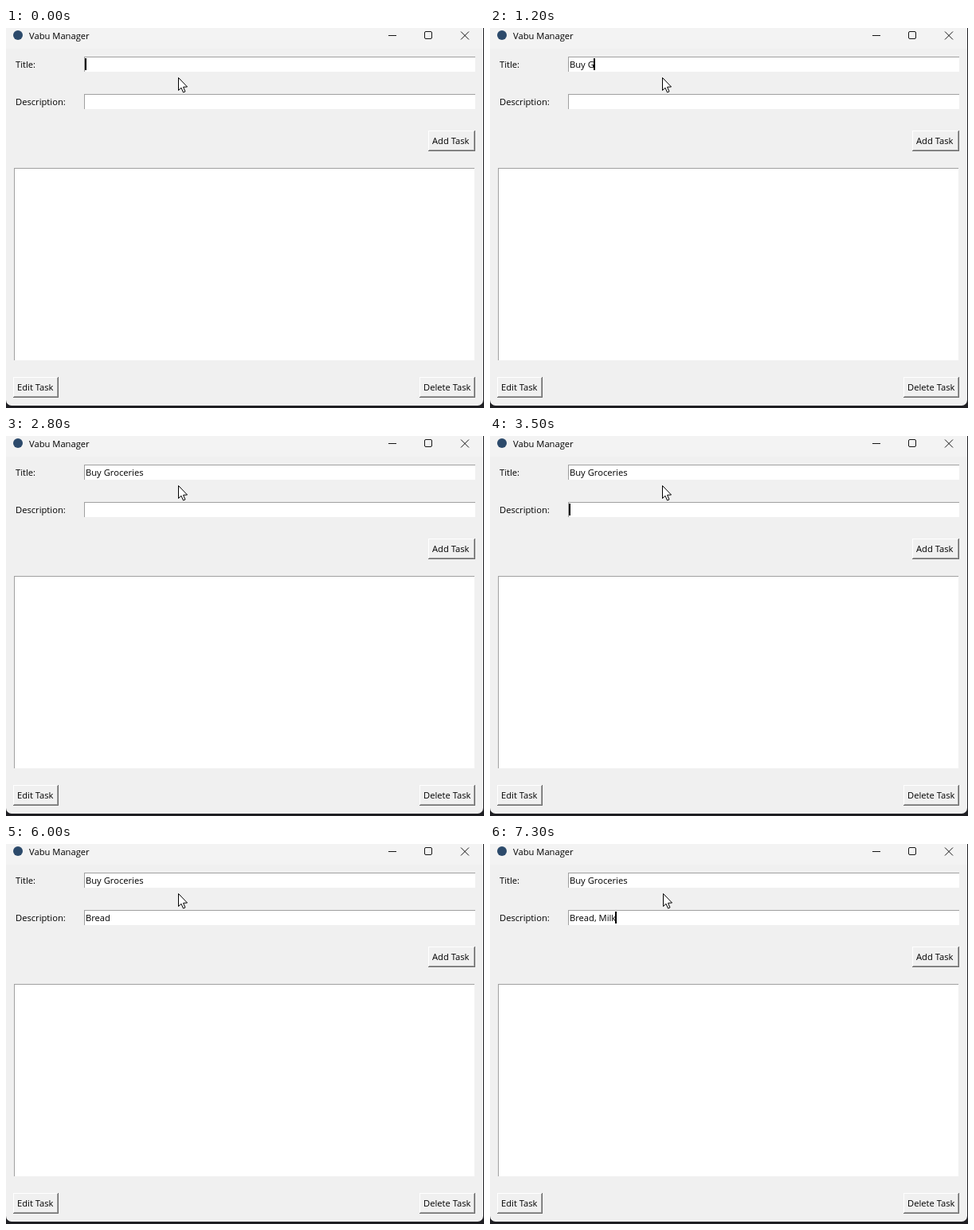
An HTML page with a canvas that plays this animation: 600 px wide and 478 px high, repeating every 8 s.

```html
<!DOCTYPE html>
<html lang="en">
<head>
<meta charset="utf-8">
<title>Task window</title>
<style>
  html, body { margin: 0; width: 100%; height: 100%; overflow: hidden; background: #1f1f23; }
  canvas { display: block; }
</style>
</head>
<body>
<canvas id="stage" width="600" height="478"></canvas>
<script>
const ctx = document.getElementById('stage').getContext('2d');
const LOOP = 8000;
const FONT = '11.2px "Open Sans", "Noto Sans", sans-serif';
const FACE = '#f0f0f0', SHADE = '#a0a0a0', DARK = '#696969', INK = '#000';

// [time, number of letters typed]
const titleField = {
  text: 'Buy Groceries', y: 36,
  keys: [[900, 2], [1100, 3], [1200, 5], [1600, 7], [1700, 8], [1900, 9], [2400, 11], [2500, 13]]
};
const descField = {
  text: 'Bread, Milk', y: 83,
  keys: [[4700, 2], [4900, 3], [5400, 4], [5600, 5], [6400, 8], [6700, 9], [6900, 10], [7000, 11]]
};

// Spans in which each caret is visible
titleField.caret = [[0, 200], [500, 2800], [3400, 3500]];
descField.caret = [[3500, 5900], [6400, LOOP]];

function rect(x, y, w, h, color) {
  ctx.fillStyle = color;
  ctx.fillRect(x, y, w, h);
}

function label(text, x, baseline) {
  ctx.font = FONT;
  ctx.fillStyle = INK;
  ctx.fillText(text, x, baseline);
}

function sunken(x, y, w, h) {
  rect(x, y, w, h, '#fff');
  rect(x, y, w, 1, SHADE);
  rect(x, y, 1, h, SHADE);
}

function button(text, x, y, w, textX) {
  const h = 26;
  rect(x, y, w, h, DARK);
  rect(x, y, w - 1, h - 1, '#fff');
  rect(x + 1, y + 1, w - 2, h - 2, SHADE);
  rect(x + 1, y + 1, w - 3, h - 3, FACE);
  label(text, textX, y + 17);
}

function field({ text, y, keys, caret }, t) {
  sunken(98, y, 491, 19);
  const count = keys.reduce((n, [at, length]) => t >= at ? length : n, 0);
  const typed = text.slice(0, count);
  label(typed, 100, y + 14);
  if (caret.some(([from, to]) => t >= from && t < to)) {
    rect(Math.round(99 + ctx.measureText(typed).width), y + 2, 2, 15, INK);
  }
}

function titleBar() {
  rect(0, 0, 599, 26, '#f3f3f3');
  ctx.fillStyle = '#2c4a6b';
  ctx.beginPath();
  ctx.arc(15, 9, 6, 0, Math.PI * 2);
  ctx.fill();
  label('Vabu Manager', 29, 14);

  ctx.strokeStyle = '#151515';
  ctx.lineWidth = 1;
  ctx.beginPath();
  ctx.moveTo(480, 9.5);
  ctx.lineTo(490, 9.5);
  ctx.roundRect(525.5, 4.5, 9, 9, 1.5);
  ctx.moveTo(571, 4.5);
  ctx.lineTo(581, 14.5);
  ctx.moveTo(581, 4.5);
  ctx.lineTo(571, 14.5);
  ctx.stroke();
}

function pointer(x, y) {
  const points = [[0, 0], [0, 16], [3.5, 12.7], [6, 18.5], [8.5, 17.4], [6, 11.8], [11, 11.5]];
  ctx.beginPath();
  points.forEach(([dx, dy]) => ctx.lineTo(x + dx + 0.5, y + dy + 0.5));
  ctx.closePath();
  ctx.fillStyle = '#fff';
  ctx.fill();
  ctx.strokeStyle = INK;
  ctx.lineWidth = 1;
  ctx.stroke();
}

function draw(t) {
  rect(0, 0, 600, 478, '#1f1f23');
  ctx.save();
  ctx.beginPath();
  ctx.roundRect(0, -10, 599, 485, 7);
  ctx.clip();
  rect(0, 0, 600, 478, FACE);
  titleBar();
  label('Title:', 12, 50);
  label('Description:', 12, 97);
  field(titleField, t);
  field(descField, t);
  button('Add Task', 530, 129, 59, 535);
  sunken(10, 176, 578, 242);
  button('Edit Task', 9, 439, 57, 14);
  button('Delete Task', 519, 439, 70, 524);
  ctx.restore();
  pointer(t < 7300 ? 216 : 217, 62);
}

const start = performance.now();
function tick() {
  draw((performance.now() - start) % LOOP);
  requestAnimationFrame(tick);
}
tick();
</script>
</body>
</html>
```
